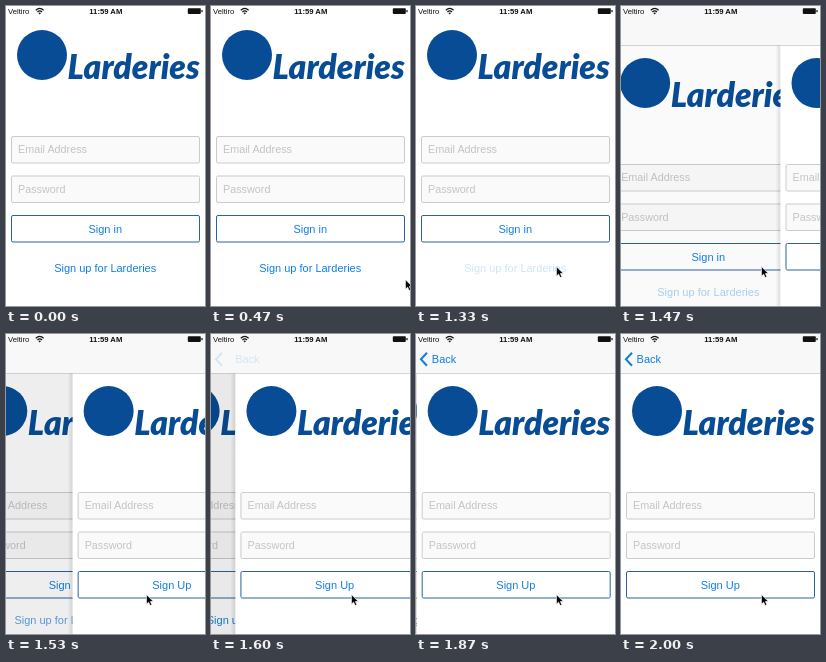
Recreate the animation shown at these times as an HTML page. Size 199 px wide and 300 px high, loop 2390 ms.

```html
<!DOCTYPE html>
<html lang="en">
<head>
<meta charset="utf-8">
<title>Sign up transition</title>
<style>
  html, body { margin: 0; width: 100%; height: 100%; overflow: hidden; background: #fff; }
  svg { display: block; width: 100vw; height: 100vh; }
  text { font: 10.8px "Liberation Sans", Arial, sans-serif; }
  .mid { text-anchor: middle; }
  .hint { fill: #c4c4c6; }
  .blue { fill: #117ee6; font-size: 11px; }
  .field { fill: #fafafa; stroke: #cbcbcb; }
  .button { fill: #fff; stroke: #2a629c; }
  .brand { fill: #084c95; }
  .brand text { font: italic 900 33.6px Lato, sans-serif; }
  .status text { font-size: 7.7px; fill: #111; }
  .status .clock { font-weight: bold; }
</style>
</head>
<body>
<svg id="stage" viewBox="0 0 199 300" xmlns="http://www.w3.org/2000/svg"></svg>
<script>
const LOOP = 2390;
const WIDTH = 199;
const NAV_SHIFT = 28;
const stage = document.getElementById("stage");

const box = (y, kind) =>
  `<rect class="${kind}" x="5.5" y="${y}" width="188" height="26.5" rx="1.5"/>`;

const field = (y, label) =>
  `${box(y, "field")}<text class="hint" x="12" y="${y + 16.6}">${label}</text>`;

const form = action => `
  <g class="brand">
    <circle cx="36" cy="49" r="25"/>
    <text x="61.5" y="73">Larderies</text>
  </g>
  ${field(130.5, "Email Address")}
  ${field(170, "Password")}
  ${box(209.5, "button")}
  <text class="blue mid" x="99.2" y="226.6">${action}</text>`;

stage.innerHTML = `
  <defs>
    <linearGradient id="edge">
      <stop offset="0" stop-color="#000" stop-opacity="0"/>
      <stop offset="1" stop-color="#000" stop-opacity=".12"/>
    </linearGradient>
  </defs>
  <rect width="199" height="300" fill="#fff"/>
  <g id="login">
    <g id="loginForm">${form("Sign in")}</g>
    <text id="link" class="blue mid" x="99.2" y="265.6">Sign up for Larderies</text>
  </g>
  <rect id="dim" width="199" height="300"/>
  <g id="signup">
    <rect x="-5" width="5" height="300" fill="url(#edge)"/>
    <rect width="199" height="300" fill="#fff"/>
    <g transform="translate(0 ${NAV_SHIFT})">${form("Sign Up")}</g>
  </g>
  <g id="nav">
    <rect width="199" height="39" fill="#f8f8f8"/>
    <rect y="39" width="199" height=".6" fill="#b8b8b8"/>
    <g id="back">
      <path d="M11 18.8 4.9 25.3 11 31.8" fill="none" stroke="#117ee6" stroke-width="2"/>
      <text id="backLabel" class="blue" x="15.6" y="29.2">Back</text>
    </g>
  </g>
  <g class="status">
    <text x="2" y="8">Veltiro</text>
    <g fill="none" stroke="#111" stroke-width="1.2">
      <path d="M29.8 4.3Q33.7 .6 37.6 4.3M31.4 6Q33.7 3.8 36 6"/>
    </g>
    <path d="M32.4 7.1Q33.7 6 35 7.1L33.7 8.5Z" fill="#111"/>
    <text class="clock mid" x="99.8" y="8">11:59 AM</text>
    <rect x="181.8" y="2.3" width="13" height="5.6" rx=".8" fill="#111"/>
    <rect x="195.4" y="4" width="1.2" height="2.2" rx=".5" fill="#111"/>
  </g>
  <path id="cursor" d="M0 0V9.6L2.2 7.6 3.8 11 5.5 10.2 4 7H7Z"
        fill="#000" stroke="#fff" stroke-width=".7"/>`;

const part = Object.fromEntries(
  [...stage.querySelectorAll("[id]")].map(el => [el.id, el]));
const clamp = v => Math.min(1, Math.max(0, v));
const move = (el, x, y) => el.setAttribute("transform", `translate(${x} ${y})`);
const show = (el, on) => el.setAttribute("display", on ? "inline" : "none");
const fade = (el, v) => el.setAttribute("opacity", v);

// The screen refreshes 15 times a second, on 10 ms boundaries.
function tickAt(t) {
  const tick = Math.floor(t / 200 * 3) + 1;
  return Math.round(tick * 20 / 3) * 10 > t ? tick - 1 : tick;
}

// Share of the slide still to go: a damped spring.
function slideLeft(n) {
  if (n < 0) return 1;
  if (n >= 8) return 0;
  const a = 0.82 + 1.52 * n - 0.0575 * n * n;
  return (1 + a) * Math.exp(-a);
}

function render(t) {
  const tick = tickAt(t);
  const n = tick - 22;
  const sliding = n >= 0;
  const left = slideLeft(n);
  const done = 1 - left;

  move(part.login, -0.3 * WIDTH * done, 0);
  move(part.loginForm, 0, sliding ? NAV_SHIFT : 0);
  move(part.link, 0, sliding ? 24 : 0);
  fade(part.link, tick < 20 ? 1 : sliding ? clamp(0.35 + 0.35 * n) : 0.2);
  fade(part.dim, 0.1 * done);

  show(part.signup, sliding);
  move(part.signup, WIDTH * left, 0);
  show(part.nav, sliding);
  fade(part.back, clamp((n - 1.6) * 0.375));
  move(part.backLabel, 0.35 * WIDTH * left, 0);

  show(part.cursor, tick >= 7);
  const away = (1 - clamp((tick - 7) / 6)) ** 2;
  move(part.cursor, 140.4 + 54 * away, (tick < 15 ? 261.6 : 260.6) + 12 * away);
}

const start = performance.now();
function loop() {
  render((performance.now() - start) % LOOP);
  requestAnimationFrame(loop);
}
loop();
</script>
</body>
</html>
```
